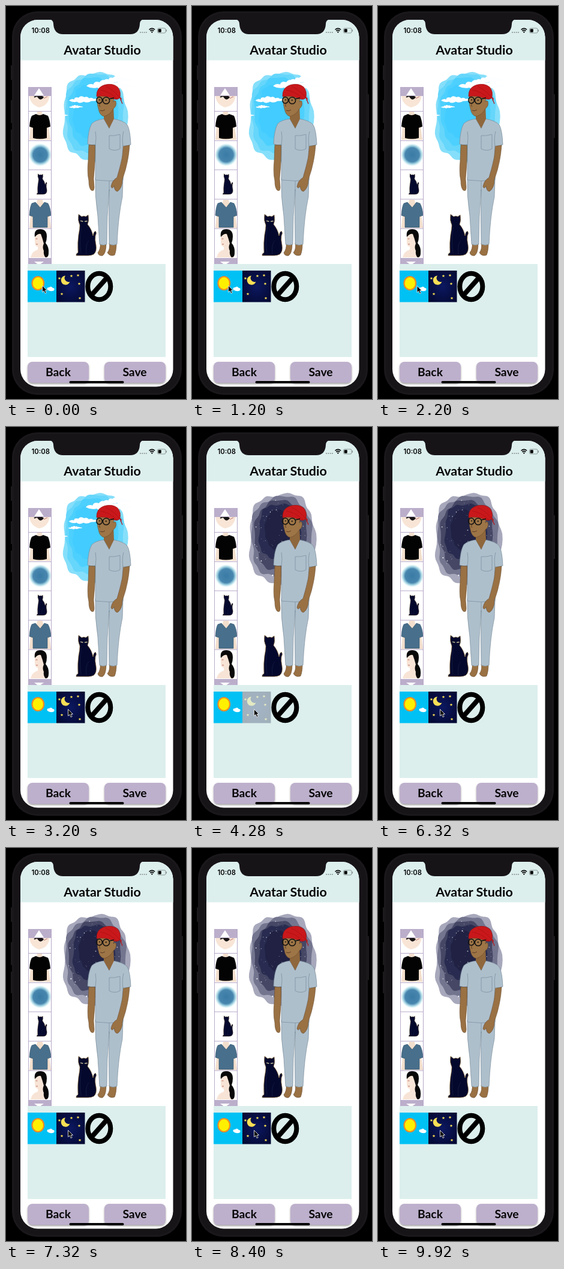
Recreate the animation shown at these times as an HTML page. Size 300x655 px, loop 9.96 s.

```html
<!DOCTYPE html>
<html lang="en">
<head>
<meta charset="utf-8">
<title>Avatar Studio</title>
<style>
html, body { margin: 0; width: 100%; height: 100%; overflow: hidden; background: #000; }
svg { display: block; width: 100vw; height: 100vh; }
text { font-family: Lato, sans-serif; font-weight: 700; fill: #050505; }
</style>
</head>
<body>
<svg viewBox="0 0 300 655">
  <defs>
    <clipPath id="screen"><rect x="24" y="23" width="254.500" height="611.500" rx="29"/></clipPath>
    <clipPath id="tiles"><rect x="37" y="135" width="39" height="295"/></clipPath>
    <clipPath id="faceTile"><rect x="37" y="150" width="38" height="25"/></clipPath>
    <radialGradient id="iris">
      <stop offset="0" stop-color="#397ba5"/><stop offset=".62" stop-color="#4886ae"/>
      <stop offset=".76" stop-color="#8fc3d8"/><stop offset=".9" stop-color="#d8f1f5"/>
      <stop offset="1" stop-color="#fff"/>
    </radialGradient>
    <radialGradient id="dark" r=".75">
      <stop offset="0" stop-color="#0c1860"/><stop offset="1" stop-color="#02062b"/>
    </radialGradient>
    <filter id="shade" x="-10%" y="-10%" width="120%" height="140%">
      <feDropShadow dx="0" dy="2" stdDeviation="1.5" flood-color="#555" flood-opacity=".55"/>
    </filter>
    <g id="cat">
      <path d="M121 347 L126 351 Q130 349 133 351 L137 348 Q139 357 136 364 Q143 372 145 383 Q146 376 149 375 Q152 378 149 383 Q148 390 150 398 Q152 409 146 414 Q142 416 137 416 L117 416 Q116 413 120 411 Q119 394 121 381 Q123 371 123 365 Q119 357 121 347Z"
        fill="#04082c" stroke="#a9874a" stroke-width=".65"/>
      <path d="M125 369 Q122 392 125 412 M138 391 Q132 397 134 414" fill="none" stroke="#18204a" stroke-width=".7"/>
    </g>
    <path id="cloud" d="M0 8 Q4 4 9 6 Q10 1 17 3 Q20 -2 27 2 Q33 0 35 4 Q41 2 43 5 Q50 4 52 8 Q44 9 39 9 Q32 13 26 10 Q18 14 14 10 Q7 12 0 8Z"/>
  </defs>

  <path d="M8 99h4v24h-4zM8 157h4v38h-4zM8 206h4v36h-4zM291 147h4v73h-4z" fill="#1c1a1d"/>
  <rect x="10" y="9" width="283" height="639" rx="42" fill="#1b181c"/>
  <rect x="13" y="12" width="277" height="633" rx="39" fill="#171418"/>
  <g clip-path="url(#screen)">
    <path d="M24 23h255v612H24z" fill="#fff"/>
    <path d="M24 23h255v67.500H24z" fill="#dcefed"/>
    <path d="M73 22 Q79 24 79 30 Q80 47 95 47 H207 Q222 47 223 30 Q223 24 229 22Z" fill="#171418"/>
    <path d="M36 430h230v155H36z" fill="#dcefed"/>
  </g>

  <text x="42.500" y="45" font-size="11.300" style="font-family:Inter,sans-serif;font-weight:600">10:08</text>
  <g fill="#87918f"><circle cx="224" cy="44" r="1"/><circle cx="227.300" cy="44" r="1"/><circle cx="230.600" cy="44" r="1"/><circle cx="233.900" cy="44" r="1"/></g>
  <path d="M238.500 39.500 Q243.300 35.300 248.100 39.500 M240.300 41.700 Q243.300 39.200 246.300 41.700" fill="none" stroke="#080808" stroke-width="1.600"/>
  <path d="M241.600 43 L243.300 45 L245 43 Q243.300 41.800 241.600 43Z"/>
  <rect x="252.500" y="37" width="13.500" height="8" rx="2" fill="none" stroke="#788381" stroke-width=".8"/>
  <rect x="253.700" y="38.200" width="5" height="5.600" rx="1"/>
  <path d="M267.300 39.500v3" stroke="#788381" stroke-width="1.200"/>
  <text x="160.500" y="81" font-size="21.400" text-anchor="middle">Avatar Studio</text>

  <g id="day"></g>
  <g id="night"></g>

  <use href="#cat"/>
  <path id="eyes" d="M124 358 L128.500 359.200 M131 359.200 L135.500 358.300" stroke="#e8dfac" stroke-width="1.200"/>

  <g id="feet" stroke="#65482e" stroke-width=".6" fill="#9a7143">
    <path d="M157 395 Q158 405 153 411 Q154 417 161 416 Q167 412 167 395Z"/>
    <path d="M172 395 Q174 405 169 411 Q173 418 181 415 Q184 408 184 395Z"/>
  </g>
  <g fill="#aebfcc" stroke="#788b99" stroke-width=".7">
    <path d="M149 286 Q148 318 153 350 L156 397 Q162 400 168 397 Q168 350 172 306 Q171 350 172 397 Q179 400 185 397 Q187 350 194 318 L195 286Z"/>
    <path d="M163 188 Q149 190 143 196 Q137 206 136 230 Q142 233 149 231 L149 290 Q172 293 195 290 L195 233 Q203 234 208 231 Q207 206 202 198 Q196 191 179 188 L172 204Z"/>
    <path d="M149 232 Q151 219 149 209 M195 234 Q193 219 196 209 M172 308 V292 M172 216 Q180 217 190 214 V238 Q181 243 172 238Z" fill="none"/>
  </g>
  <g id="arms" stroke="#65482e" stroke-width=".6" fill="#9a7143">
    <path d="M138 231.500 L137 258 Q135 278 138 291 Q138 303 142 307 Q147 310 147 302 L146 288 Q149 258 148.500 232Z"/>
    <path d="M195.500 234 Q195 252 189 272 L185 286 Q177 290 175 301 Q177 306 180 300 Q181 309 186 309 Q194 303 194 289 Q204 262 206 232Z"/>
  </g>
  <path d="M163 176 L163 188 L172 204 L180 188 L179 164Z" fill="#8f673c"/>
  <path d="M153 147 Q151 162 154 171 Q156 183 164 184 Q174 181 179 171 Q185 167 183 159 Q181 156 179 160 L181 145Z" fill="#9d7546" stroke="#6b4a2d" stroke-width=".6"/>
  <path d="M158 160 Q154 166 157 168 M157 174 Q161 176 165 173" fill="none" stroke="#573620" stroke-width=".9"/>
  <path d="M151 151 Q150 136 164 131.500 Q178 128 186 135 Q192 141 190 153 Q186 157 180 155 Q165 148 151 151Z" fill="#c9181b" stroke="#8e1013" stroke-width=".6"/>
  <path d="M166 134 Q178 139 189 152 M157 140 Q174 143 185 155" fill="none" stroke="#a30d12" stroke-width=".6"/>
  <path d="M189 152 Q194 153 191 158 M190 153 Q192 158 194 163" fill="none" stroke="#b5161a" stroke-width="1.200"/>
  <g fill="none" stroke="#101010" stroke-width="1.500">
    <ellipse cx="155.500" cy="157" rx="4.800" ry="5.300"/><ellipse cx="167" cy="157.500" rx="5.600" ry="5.600"/>
    <path d="M160 156h2M172 155 L180 153"/>
  </g>
  <path d="M155 156.500h2M165.500 157h2.500" stroke="#17100b" stroke-width="1.500"/>

  <g clip-path="url(#tiles)">
    <path d="M37 135h39v295H37z" fill="#fff"/>
    <g clip-path="url(#faceTile)">
      <path d="M39 147 Q39 164 55 169 Q72 166 73 147Z" fill="#f8e5d6"/>
      <path d="M47 152 Q53 148 60 152" fill="none" stroke="#222" stroke-width="2"/>
      <path d="M52 151 Q57 160 63 152 Q60 148 52 151Z" fill="#171314"/>
      <path d="M63 154 L69 151" stroke="#b9776e"/>
    </g>
    <path d="M39 223 L41 200 L51 182 L52 176 H60 L61 182 L71 200 L74 223Z" fill="#f3dfcd"/>
    <path d="M50 180 Q56 184 62 180 L70 183 Q73 189 74 201 L68 203 V220 Q56 223 45 220 V203 L39 201 Q40 188 43 183Z" fill="#030303"/>
    <circle cx="57" cy="248" r="19" fill="url(#iris)"/>
    <use href="#cat" transform="translate(-8.500 106) scale(.51 .5)"/>
    <path d="M39 370 L41 348 L51 328 L52 323 H61 L62 328 L72 348 L75 370Z" fill="#f3dfcd"/>
    <path d="M49 327 L57 336 L64 327 L70 329 Q74 336 75 349 L69 351 V369 H45 V351 L39 349 Q40 334 43 329Z" fill="#486f8b" stroke="#31536c" stroke-width=".6"/>
    <path d="M41 419 Q43 409 53 406 L53 401 Q48 401 48 393 Q47 383 51 377 L65 378 L63 406 L70 412 V419Z" fill="#f8e4d6"/>
    <path d="M48 385 Q46 372 57 372 Q68 372 68 384 Q68 390 66 395 Q72 402 71 412 Q71 419 66 419 Q62 415 63 408 Q60 402 63 396 Q61 388 58 380 Q53 379 48 385Z" fill="#090809"/>
    <path d="M49.500 388h3M50 397h3" stroke="#b66d63"/>
    <path d="M37 135h39v15H37zM37 420h39v10H37z" fill="#bbaecb"/>
    <path d="M47 149 L55 137 L63 149ZM47 426 L55 432 L63 426Z" fill="#fff"/>
    <path d="M37 175.500h38M37 224.500h38M37 273h38M37 322h38M37 371h38M37.400 135v295M75.500 135v295" stroke="#b7aac9" stroke-width="1.100"/>
  </g>

  <path d="M36 441h48v52.500H36z" fill="#00c1f4"/>
  <ellipse cx="53.300" cy="462" rx="9.800" ry="11" fill="#fff000" stroke="#ef8b27" stroke-width="2.200"/>
  <path d="M69 473 Q67 469 72 469 Q75 466 78 470 Q82 470 80 474 Q75 477 69 473Z" fill="#fff"/>
  <g id="nightTile">
    <path d="M84 441h47.500v52.500H84z" fill="url(#dark)"/>
    <path d="M99 449.500 A7.600 7.600 0 1 0 106.500 459.500 A6.500 6.500 0 0 1 99 449.500Z" fill="#f8df55"/>
    <g id="icons" fill="#f8df55"></g>
  </g>
  <ellipse cx="155.300" cy="467.500" rx="19" ry="21.800" fill="none" stroke="#000" stroke-width="8"/>
  <path d="M141.500 483 L169 452" stroke="#000" stroke-width="8"/>

  <g fill="#bdb0cc" filter="url(#shade)">
    <rect x="36" y="593" width="102" height="35" rx="8"/><rect x="164" y="593" width="102" height="35" rx="8"/>
  </g>
  <g font-size="19.300" text-anchor="middle"><text x="87" y="616.500">Back</text><text x="214.500" y="616.500">Save</text></g>
  <rect x="105.500" y="625" width="91" height="4" rx="2"/>
  <path id="cursor" d="M0 0 V11 L2.600 8.700 L4.600 13 L6.600 12 L4.700 8 H8Z" stroke="#fff" stroke-width=".8"/>
</svg>
<script>
const LOOP = 9960, SWITCH = 4200;
const $ = id => document.getElementById(id);
const clamp = x => Math.max(0, Math.min(1, x));
const ease = x => { x = clamp(x); return x * x * (3 - 2 * x); };

function add(parent, name, attrs) {
  const el = document.createElementNS('http://www.w3.org/2000/svg', name);
  for (const k in attrs) el.setAttribute(k, attrs[k]);
  return parent.appendChild(el);
}

let seed = 17;
const rnd = () => (seed = seed * 16807 % 2147483647) / 2147483647;

// Watercolour patch: a rounded box with a scalloped edge
function blob(parent, cx, cy, rx, ry, fill, phase) {
  const pts = [];
  const box = v => Math.sign(v) * Math.abs(v) ** 0.8;
  for (let i = 0; i < 90; i++) {
    const a = i * Math.PI / 45;
    const r = 0.96 + 0.035 * Math.sin(5 * a + phase) + 0.025 * Math.sin(13 * a + phase * 2);
    pts.push((cx + rx * r * box(Math.cos(a))).toFixed(1) + ' ' + (cy + ry * r * box(Math.sin(a))).toFixed(1));
  }
  add(parent, 'path', { d: 'M' + pts.join('L') + 'Z', fill });
}

function cloud(x, y, scale) {
  return add($('day'), 'use', { href: '#cloud', fill: '#fdfeff', transform: `translate(${x} ${y}) scale(${scale})` });
}

blob($('day'), 148, 185, 55, 77, '#86dffa', 1);
blob($('day'), 147, 181, 50, 69, '#66d6fb', 2.4);
blob($('day'), 146, 177, 43, 59, '#4dd0fd', 3.7);
blob($('day'), 144, 176, 34, 48, '#43ccff', 0.6);
const clouds = [
  [105, 150, 0.95], [134, 123, 1.3], [163, 117, 0.9], [170, 128, 0.8], [87, 180, 0.32], [105, 165, 0.45]
].map(c => ({ c, el: cloud(...c) }));

blob($('night'), 150, 187, 57, 79, '#a7a8bb', 1);
blob($('night'), 149, 184, 52, 70, '#73758f', 2.4);
blob($('night'), 148, 181, 45, 60, '#454765', 3.7);
blob($('night'), 146, 175, 36, 49, '#292c50', 0.6);
blob($('night'), 145, 171, 24, 34, '#202143', 4.5);
const stars = Array.from({ length: 95 }, () => {
  const a = rnd() * 2 * Math.PI, r = Math.sqrt(rnd());
  return {
    phase: rnd() * 6.28,
    el: add($('night'), 'circle', {
      cx: 149 + 47 * r * Math.cos(a), cy: 185 + 66 * r * Math.sin(a), r: 0.4 + rnd() ** 3 * 0.8, fill: '#fff'
    })
  };
});

for (const [x, y] of [[89, 454], [109, 450], [120, 449], [122, 463], [93, 480], [123, 487]]) {
  let d = '';
  for (let i = 0; i < 10; i++) {
    const a = i * Math.PI / 5 - Math.PI / 2, r = i % 2 ? 1.1 : 2.6;
    d += (i ? 'L' : 'M') + (x + r * Math.cos(a)) + ' ' + (y + r * Math.sin(a));
  }
  add($('icons'), 'path', { d: d + 'Z' });
}

function draw(t) {
  const isNight = t >= SWITCH;
  $('day').style.display = isNight ? 'none' : '';
  $('night').style.display = isNight ? '' : 'none';

  const drift = 1.2 * Math.sin(t / 700);
  clouds.forEach(({ c: [x, y, s], el }, i) =>
    el.setAttribute('transform', `translate(${x + drift * (i % 2 ? 1 : 0.4)} ${y}) scale(${s})`));
  const beat = Math.floor(t / 120);
  for (const s of stars) s.el.setAttribute('opacity', 0.72 + 0.28 * Math.sin(beat * 0.7 + s.phase));

  const blink = t >= 1920 && (t - 1920) % 2000 < 400;
  $('eyes').style.display = blink ? 'none' : '';

  const press = ease((t - 4040) / 150) - ease((t - 4240) / 260);
  $('nightTile').setAttribute('opacity', 1 - 0.78 * press);

  const move = ease((t - 2040) / 800);
  $('cursor').setAttribute('transform', `translate(${60.500 + 43 * move} ${466 + 4.500 * move})`);
}

const start = performance.now();
function tick(now) {
  draw(Math.max(0, now - start) % LOOP);
  requestAnimationFrame(tick);
}
draw(0);
requestAnimationFrame(tick);
</script>
</body>
</html>
```
